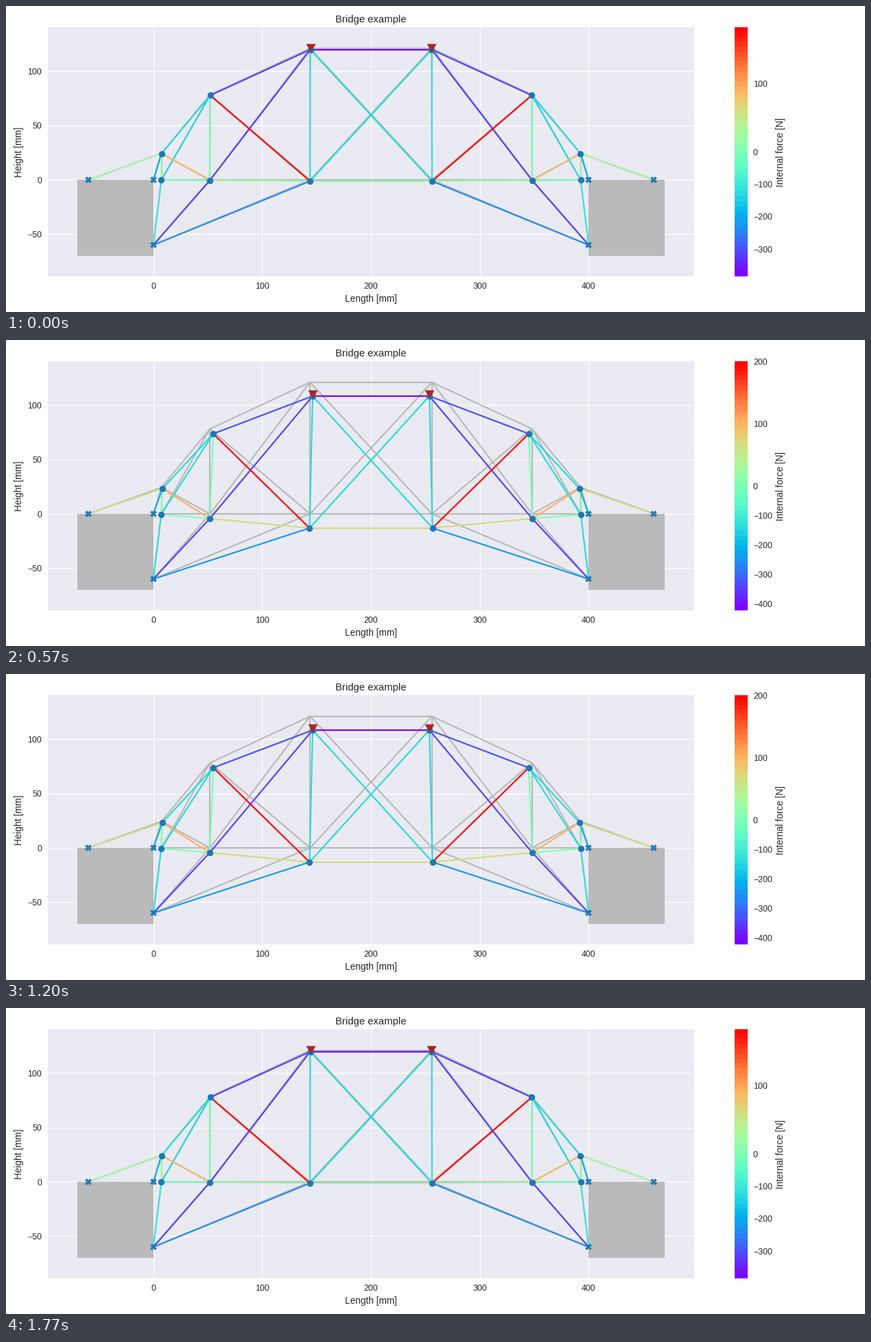
Animation of 1252x447 px, one loop 1800 ms. Source, as a matplotlib script:

```python
import matplotlib.pyplot as plt
import numpy as np
from matplotlib.animation import FuncAnimation
from matplotlib.collections import LineCollection
from matplotlib.patches import Rectangle

W, H, DPI = 1252, 447, 1252 / 14
FRAMES, INTERVAL = 60, 30
SPAN = 400
INK, GREY, BLUE = "#262626", "#bababa", "#1f77b4"

plt.rcParams.update({
    "font.family": "Liberation Sans",
    "font.size": 10, "axes.labelsize": 11, "axes.titlesize": 12,
    "text.color": INK, "axes.labelcolor": INK,
    "xtick.color": INK, "ytick.color": INK,
    "xtick.major.size": 0, "ytick.major.size": 0,
    "xtick.major.pad": 7, "ytick.major.pad": 7,
    "axes.facecolor": "#eaeaf2", "axes.axisbelow": True,
    "grid.color": "white", "grid.linewidth": 1,
})

# Left half of the truss: rest position and drift per load step
SUPPORTS = {"A": (-60, 0), "B": (0, 0), "C": (0, -60)}
JOINTS = {
    "a": ((7.4, 24.3), (0.043, -0.050)),
    "b": ((7.4, 0), (-0.010, -0.028)),
    "c": ((52, 78.3), (0.145, -0.214)),
    "d": ((52, 0), (-0.007, -0.208)),
    "e": ((144, 121.2), (0.113, -0.605)),
    "f": ((144, 0), (-0.022, -0.586)),
}
SAG = 0.0017  # extra sag of joint f, grows with the square of the load

# Members: colour position at load step 0 and 25 (' marks the right half)
MEMBERS = [
    ("A", "a", 0.58, 0.665), ("B", "a", 0.245, 0.24), ("C", "b", 0.37, 0.355),
    ("a", "b", 0.55, 0.53), ("a", "c", 0.33, 0.33), ("b", "c", 0.33, 0.34),
    ("b", "d", 0.46, 0.53), ("a", "d", 0.73, 0.76), ("c", "d", 0.48, 0.48),
    ("c", "e", 0.09, 0.115), ("d", "e", 0.09, 0.10), ("C", "d", 0.09, 0.085),
    ("d", "f", 0.55, 0.71), ("C", "f", 0.19, 0.22), ("e", "f", 0.35, 0.335),
    ("c", "f", 1, 1), ("e", "f'", 0.33, 0.34),
]
CROSS = [("e", "e'", 0, 0), ("f", "f'", 0.55, 0.71)]


def flip(name):
    return name[0] if name.endswith("'") else name + "'"


members = MEMBERS + [(flip(p), flip(q), u, v) for p, q, u, v in MEMBERS] + CROSS
cmap = plt.get_cmap("rainbow", 50)


def pose(load):
    pts = dict(SUPPORTS)
    for name, ((x, y), (dx, dy)) in JOINTS.items():
        pts[name] = (x + dx * load, y + dy * load)
    fx, fy = pts["f"]
    pts["f"] = (fx, fy - SAG * load ** 2)
    pts.update({flip(n): (SPAN - x, y) for n, (x, y) in list(pts.items())})
    return pts


def segments(pts):
    return [(pts[p], pts[q]) for p, q, *_ in members]


def both(pts, names):
    return zip(*[pts[n] for name in names for n in (name, flip(name))])


def px_axes(x, y, w, h):
    ax = fig.add_axes([x / W, 1 - (y + h) / H, w / W, h / H])
    for side in ax.spines.values():
        side.set_visible(False)
    return ax


fig = plt.figure(figsize=((W + 0.01) / DPI, (H + 0.01) / DPI), dpi=DPI,
                 facecolor="white")

ax = px_axes(60.9, 31, 942.2, 364)
ax.set(xlim=(-97, 497), ylim=(-88.9, 140.6), title="Bridge example",
       xlabel="Length [mm]", ylabel="Height [mm]",
       xticks=range(0, 401, 100), yticks=range(-50, 101, 50))
ax.grid(True)
for x in (-70, SPAN):
    ax.add_patch(Rectangle((x, -70), 70, 70, fc=GREY, lw=0, zorder=1.5))

rest = pose(0)
ax.add_collection(LineCollection(segments(rest), colors=GREY, linewidths=1.75,
                                 zorder=2), autolim=False)
truss = LineCollection(segments(rest), linewidths=1.75, zorder=3)
ax.add_collection(truss, autolim=False)

style = dict(ls="", color=BLUE, mew=0, ms=7.5, zorder=4)
ax.plot(*both(rest, SUPPORTS), marker="X", **style)
joints, = ax.plot([], [], marker="o", **style)
arrow = [(0, -3), (-7, 9), (7, 9), (0, -3)]
loads, = ax.plot([], [], ls="", marker=arrow, ms=18 * 72 / DPI, mew=0,
                 color="firebrick", zorder=5)

cax = px_axes(1061.5, 31, 18.7, 364)
cax.imshow(np.linspace(0, 1, cmap.N)[:, None], cmap=cmap, origin="lower",
           extent=(0, 1, 0, 1), aspect="auto", interpolation="nearest")
cax.set(xticks=[], ylim=(0, 1))
cax.yaxis.tick_right()
cax.yaxis.set_label_position("right")
cax.set_ylabel("Internal force [N]")


def scale_bar(step):
    """Two-sided scale with zero force fixed at the middle."""
    low, high = 384 + 2.02 * step, 182 + 0.955 * step
    forces = [n for n in range(-400, 201, 100) if -low <= n <= high]
    cax.set_yticks([0.5 + 0.5 * n / (high if n > 0 else low) for n in forces],
                   [str(n).replace("-", "\u2212") for n in forces])


def update(i):
    step = min(i, FRAMES - 1 - i)
    pts = pose(step + 2)
    truss.set_segments(segments(pts))
    truss.set_color([cmap(float(u + (v - u) * step / 25))
                     for _, _, u, v in members])
    joints.set_data(*both(pts, JOINTS))
    loads.set_data(*both(pts, "e"))
    scale_bar(step)
    return truss, joints, loads


anim = FuncAnimation(fig, update, frames=FRAMES, interval=INTERVAL,
                     repeat=True, repeat_delay=0, blit=False)
plt.show()
```
